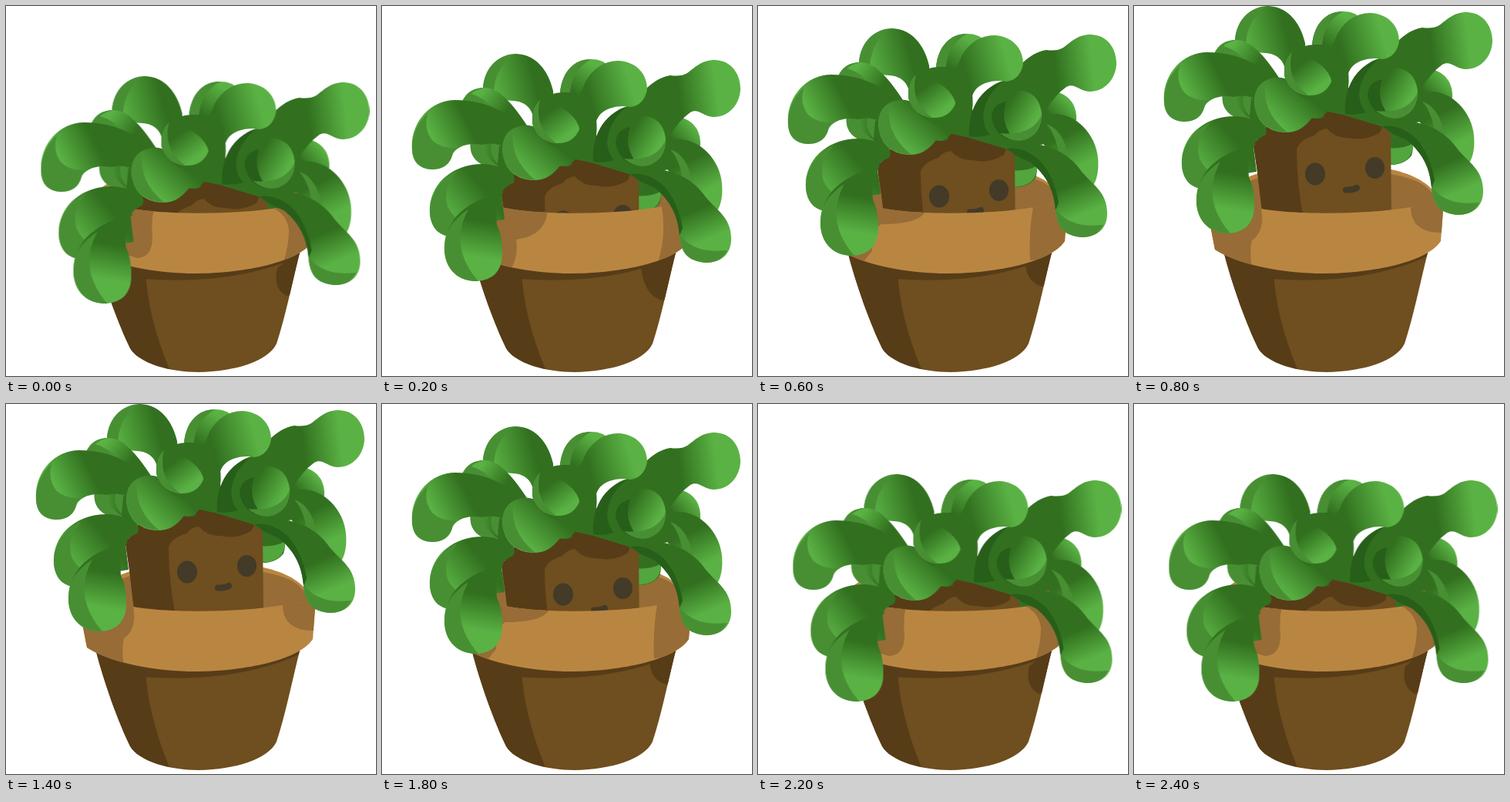
Write an HTML page that moves like this. It is 480 by 480 pixels and loops after 3.2 s.

```html
<!DOCTYPE html>
<html lang="en">
<head>
<meta charset="utf-8">
<title>Shy potted plant</title>
<style>
  html, body { margin: 0; width: 100%; height: 100%; overflow: hidden; background: #fff; }
  svg { display: block; width: 100vw; height: 100vh; }
  .dark { fill: #32701f; }
  .mid { fill: #488f34; }
  .deep { fill: #275e19; }
  .clay { fill: #b98642; }
  .clay-shade { fill: #976c36; }
  .wood { fill: #6f4e1f; }
  .wood-shade { fill: #573c18; }
  .ink { fill: #433a28; }
  .line { fill: none; stroke: #433a28; stroke-linecap: round; }

  .plant, .pose, .open, .shut { animation: 3200ms step-end infinite; }
  .plant { animation-name: rise; }
  .open { animation-name: open; }
  .shut { animation-name: shut; }
  .low { animation-name: low; }
  .peek { animation-name: peek; }
  .half { animation-name: half; }
  .full { animation-name: full; }

  @keyframes rise {
    0%, 68.75%, 100% { transform: translate(6.5px, 91px); }
    6.25%, 62.5% { transform: translate(0, 62px); }
    18.75%, 56.25% { transform: translate(0, 29px); }
    25% { transform: translate(0, 0); }
  }
  @keyframes low {
    0%, 68.75%, 100% { visibility: visible; }
    6.25% { visibility: hidden; }
  }
  @keyframes peek {
    0%, 18.75%, 68.75%, 100% { visibility: hidden; }
    6.25%, 62.5% { visibility: visible; }
  }
  @keyframes half {
    0%, 25%, 62.5%, 100% { visibility: hidden; }
    18.75%, 56.25% { visibility: visible; }
  }
  @keyframes full {
    0%, 56.25%, 100% { visibility: hidden; }
    25% { visibility: visible; }
  }
  @keyframes open {
    0%, 43.75%, 100% { visibility: visible; }
    37.5% { visibility: hidden; }
  }
  @keyframes shut {
    0%, 43.75%, 100% { visibility: hidden; }
    37.5% { visibility: visible; }
  }
</style>
</head>
<body>
<svg viewBox="0 0 480 480">
  <defs>
    <linearGradient id="leaf" gradientUnits="userSpaceOnUse">
      <stop offset="0" stop-color="#32701f"/>
      <stop offset="1" stop-color="#5ab244"/>
    </linearGradient>
    <linearGradient id="topLeft" href="#leaf" x1="196" y1="30" x2="142" y2="44"/>
    <linearGradient id="backLeft" href="#leaf" x1="158" y1="80" x2="124" y2="58"/>
    <linearGradient id="farLeft" href="#leaf" x1="108" y1="84" x2="64" y2="106"/>
    <linearGradient id="smallLeft" href="#leaf" x1="150" y1="126" x2="114" y2="130"/>
    <linearGradient id="topMid" href="#leaf" x1="248" y1="50" x2="274" y2="14"/>
    <linearGradient id="topRight" href="#leaf" x1="268" y1="52" x2="322" y2="36"/>
    <linearGradient id="farRight" href="#leaf" x1="386" y1="52" x2="434" y2="46"/>
    <linearGradient id="backRight" href="#leaf" x1="380" y1="114" x2="404" y2="94"/>
    <linearGradient id="sideRight" href="#leaf" x1="404" y1="136" x2="424" y2="176"/>
    <linearGradient id="center" href="#leaf" x1="220" y1="74" x2="242" y2="104"/>
    <linearGradient id="bulb" href="#leaf" x1="322" y1="104" x2="356" y2="124"/>
    <linearGradient id="front" href="#leaf" x1="222" y1="114" x2="186" y2="152"/>
    <linearGradient id="sideLeft" href="#leaf" x1="126" y1="170" x2="82" y2="206"/>
    <linearGradient id="lowLeft" href="#leaf" x1="130" y1="218" x2="122" y2="264"/>
    <linearGradient id="lowRight" href="#leaf" x1="404" y1="204" x2="420" y2="242"/>
    <clipPath id="rimClip">
      <path id="rim" d="M98 280C98 262 120 252 150 260C200 272 300 271 358 261C378 258 398 252 401 265L398 305C378 335 300 347 245 347C200 347 140 338 105 316Z"/>
    </clipPath>
    <clipPath id="bodyClip">
      <path id="body" d="M116 318C129 368 147 415 161 444C172 463 212 475 250 475C298 474 340 461 351 438C362 405 371 360 382 316Z"/>
    </clipPath>
  </defs>

  <!-- back of the pot -->
  <path class="clay" d="M98 285C102 230 160 206 250 205C340 204 392 222 401 265L360 290Z"/>
  <path class="clay-shade" d="M98 285C102 230 180 211 250 211C322 212 372 222 384 240Q398 250 401 268L360 280Z"/>

  <!-- trunk and face -->
  <g class="plant">
    <path class="dark" d="M326 150L356 160Q365 180 360 194Q350 207 330 206Z"/>
    <path fill="#53a63e" d="M328 184Q350 186 362 178Q363 206 328 206Z"/>
    <path class="wood" d="M155 181Q164 172 172 156L220 125L314 130Q320 152 333 164L334 275H167L160 215Z"/>
    <path class="wood-shade" d="M155 181Q152 176 160 174Q162 164 172 156L220 125L314 130Q320 146 324 153Q321 158 319 164Q300 176 278 171Q262 172 250 159Q240 160 234 168Q214 174 211 186Q211 230 220 275H167L160 215Z"/>
    <g class="open">
      <ellipse class="ink" cx="235" cy="218" rx="13" ry="14.5"/>
      <ellipse class="ink" cx="312.500" cy="210" rx="12.500" ry="14"/>
    </g>
    <g class="shut line" stroke-width="5">
      <path d="M223 219Q235 224 247 218"/>
      <path d="M301 212Q312 216 324 210"/>
    </g>
    <path class="line" stroke-width="8" d="M275 238.500Q284 239 289 236"/>
  </g>

  <!-- front of the pot -->
  <use href="#body" class="wood"/>
  <g clip-path="url(#bodyClip)" class="wood-shade">
    <path d="M110 310L181 345Q184 405 214 476L130 470Z"/>
    <path d="M110 310L385 310L380 325C330 348 260 360 181 354Z"/>
    <path class="pose low" d="M352 340Q346 366 364 376L390 370V310Z"/>
    <path class="pose peek" d="M336 338Q340 376 364 382L390 370V310Z"/>
    <path class="pose half" d="M347 336Q350 360 370 364L390 350V310Z"/>
  </g>
  <use href="#rim" class="clay"/>
  <g clip-path="url(#rimClip)" class="clay-shade">
    <g class="pose low">
      <path d="M90 250L192 262Q188 280 190 300Q190 326 170 327L155 322L90 330Z"/>
      <path d="M336 258Q364 266 367 290Q367 312 359 335L410 330V240Z"/>
    </g>
    <g class="pose peek">
      <path d="M90 250L215 262Q214 298 174 303Q178 328 164 345L90 340Z"/>
      <path d="M361 250Q371 295 357 335L410 330V240Z"/>
    </g>
    <g class="pose half">
      <path d="M90 250L218 262Q216 283 160 283Q148 290 148 318L130 340L90 340Z"/>
      <path d="M358 255Q351 290 353 330L410 325V240Z"/>
    </g>
    <g class="pose full">
      <path d="M90 250L164 258Q172 290 153 304Q149 320 154 345L90 340Z"/>
      <path d="M359 255Q356 296 402 294L410 240Z"/>
    </g>
  </g>

  <!-- leaves, back to front -->
  <g class="plant">
    <path fill="url(#topMid)" d="M231 50C234 22 250 7 271 7C281 7 289 10 292 15L280 60L240 62Z"/>
    <path class="mid" d="M231 50C234 22 250 7 271 7Q246 22 244 50Z"/>

    <path fill="url(#topLeft)" d="M131 44C133 18 152 0 174 0C200 1 216 22 222 48L225 100L198 92C196 70 186 62 170 61C154 60 140 54 131 44Z"/>
    <path class="mid" d="M131 44C133 18 150 2 170 1Q145 20 145 54Z"/>

    <path fill="url(#backLeft)" d="M104 62Q112 44 133 44Q148 45 157 55Q170 65 190 96L170 125L130 100Z"/>
    <path class="mid" d="M104 62Q112 44 133 44Q120 47 116 52Q134 57 145 73L130 80Z"/>

    <path fill="url(#backRight)" d="M366 100L390 83Q414 92 413 119L405 127L370 124Z"/>

    <path fill="url(#farRight)" d="M274 142C272 108 290 76 318 68C336 56 348 32 374 28Q388 30 396 25C406 18 414 8 432 8C455 9 465 28 465 46C464 66 450 82 430 82C416 81 410 70 400 76Q386 86 375 104L372 150L320 156Z"/>

    <path fill="url(#sideRight)" d="M362 116C400 98 437 130 441 168Q443 192 434 205L405 190L370 150Z"/>
    <path class="mid" d="M374 124Q404 134 406 196L392 180Q390 142 374 124Z"/>

    <path fill="url(#topRight)" d="M246 62Q258 54 264 36C274 18 290 9 306 9C330 10 344 26 344 46Q340 67 322 69Q308 66 295 71Q276 78 277 98L275 142L242 135Z"/>

    <path fill="url(#smallLeft)" d="M115 112Q112 134 129 143Q148 150 165 140L160 110Z"/>
    <path class="mid" d="M115 112Q112 134 129 143Q140 147 150 145Q132 134 128 112Z"/>
    <path class="mid" d="M142 116Q138 132 154 147L168 140L160 112Z"/>

    <path fill="url(#farLeft)" d="M39 125C36 90 62 60 95 60C135 60 166 77 189 99L200 130L158 120Q143 114 130 118C110 114 94 122 91 132C87 146 76 150 64 150C48 149 40 140 39 125Z"/>
    <path class="mid" d="M39 125Q38 96 60 76Q53 96 65 112Q76 123 98 122Q92 126 91 132C87 146 76 150 64 150C48 149 40 140 39 125Z"/>

    <path class="dark" d="M152 120L200 95L222 58Q246 42 262 58Q282 72 278 106L320 120L372 110L376 148Q356 156 342 149L330 160Q320 156 316 143Q308 132 298 139Q290 142 286 137Q278 133 270 139Q262 141 256 135Q248 134 246 144Q240 148 234 145L192 158Q180 162 174 154Q166 160 164 168L148 166Z"/>
    <path class="deep" d="M274 140C272 106 288 78 316 70Q293 90 292 115Q293 130 301 138Q288 142 274 140Z"/>

    <path fill="url(#center)" d="M195 90Q194 62 216 54Q236 50 248 64Q260 78 256 98Q248 117 226 116Q200 113 195 90Z"/>
    <path class="dark" d="M206 60Q230 42 258 56Q266 80 257 100Q252 72 206 60Z"/>
    <path class="mid" d="M195 90Q194 70 205 60Q196 94 226 116Q200 113 195 90Z"/>

    <path fill="url(#bulb)" d="M303 116Q304 86 334 80Q364 80 368 110Q368 138 344 145Q314 148 303 116Z"/>
    <path class="deep" d="M303 116Q304 98 322 95Q312 122 334 146Q308 142 303 116Z"/>
    <path class="mid" d="M314 136Q330 150 348 144Q366 136 368 112Q356 140 314 136Z"/>

    <path fill="url(#front)" d="M156 126Q156 104 172 96Q184 90 196 94Q206 118 238 126Q254 130 250 138Q240 148 231 145C220 160 208 165 194 164Q160 161 156 126Z"/>
    <path class="mid" d="M156 126Q156 104 171 97Q164 136 199 164Q160 162 156 126Z"/>

    <path fill="url(#sideLeft)" d="M62 200C64 165 95 143 130 143Q154 144 162 152Q176 158 170 168Q158 172 155 182L159 215L140 218L90 237C70 236 61 220 62 200Z"/>
    <path class="mid" d="M62 200Q64 170 98 152Q78 174 85 198Q92 212 104 218L90 237C70 236 61 220 62 200Z"/>

    <path fill="url(#lowLeft)" d="M81 250C82 215 110 190 158 179Q146 194 149 222Q157 238 156 262C155 285 140 295 120 295C95 294 80 275 81 250Z"/>
    <path class="mid" d="M81 250Q83 220 112 202Q86 250 125 295C95 296 80 275 81 250Z"/>

    <path fill="url(#lowRight)" d="M320 156Q330 149 342 149C376 148 404 162 420 186C434 203 453 212 453 240C453 260 440 271 420 271C396 269 387 257 386 234C384 212 376 192 354 174L336 166Z"/>
    <path class="deep" d="M322 156Q345 153 366 172Q384 192 390 226L386 236C384 212 376 192 354 174L336 166Z"/>
    <path class="mid" d="M386 234Q404 260 448 255C442 266 434 271 420 271C396 269 387 257 386 234Z"/>
  </g>
</svg>
</body>
</html>
```
